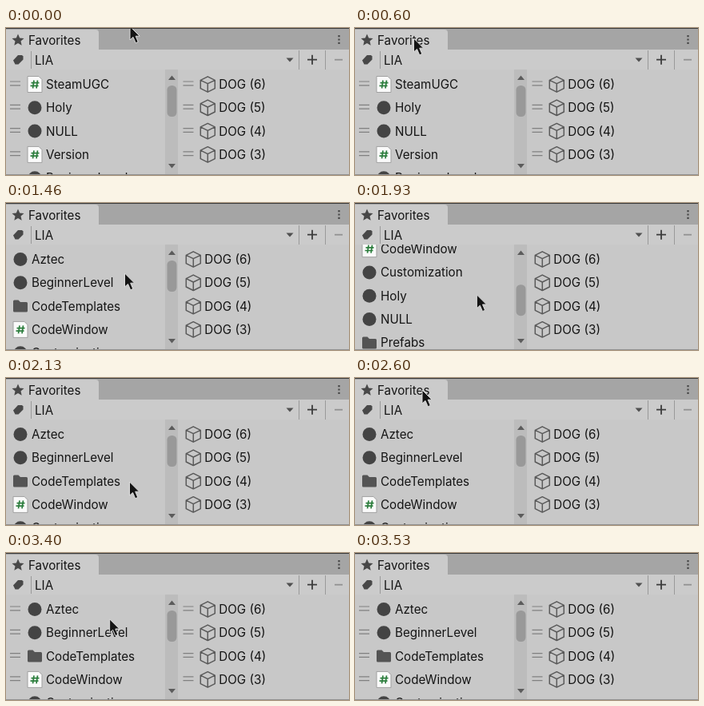
An HTML page for the animation above (4700 ms loop, 429 by 184 pixels).

```html
<!DOCTYPE html>
<html lang="en">
<head>
<meta charset="utf-8">
<title>Favorites panel</title>
<style>
  html, body { margin: 0; width: 100%; height: 100%; overflow: hidden; background: #c8c8c8; }
  svg { display: block; width: 100vw; height: 100vh; }
  text { font: 15.2px Inter, "Liberation Sans", sans-serif; fill: #141414; white-space: pre; }
  .menu text { font-size: 17.3px; fill: #262626; }
  .menu .on { fill: #fff; }
  .menu > rect { filter: drop-shadow(0 3px 4px #0007); }
</style>
</head>
<body>
<svg viewBox="0 0 429 184">
  <defs>
    <clipPath id="view"><rect y="52" width="429" height="131"/></clipPath>
    <g id="scene"><circle r="8.5" fill="#444"/></g>
    <g id="folder"><path d="M-9-6q0-1.5 1.5-1.5h5l2.5 2.5h7.500q1.500 0 1.500 1.500v9.500q0 1.500-1.500 1.500h-15q-1.500 0-1.500-1.500z" fill="#545454"/></g>
    <g id="script">
      <path d="M-9-10h14l4 4v16h-18z" fill="#fafafa" stroke="#a0a0a0" stroke-linejoin="round"/>
      <path d="M-1-5l-1.500 10M3.500-5l-1.500 10M-4.500-1.800h10M-5.500 1.800h10" fill="none" stroke="#2b7d3c" stroke-width="1.700"/>
    </g>
    <g id="cube"><path d="M0-9.700l9 4.500v10.400l-9 4.500l-9-4.500v-10.400zM-9-5.200l9 4.400l9-4.400M0-.8v10.500" fill="none" stroke="#5a5a5a" stroke-width="1.500" stroke-linejoin="round"/></g>
    <g id="handle"><path d="M0-3.500h13M0 1.300h13" stroke="#808080" stroke-width="1.200"/></g>
  </defs>

  <rect width="429" height="184" fill="#c8c8c8"/>
  <rect width="429" height="27" fill="#a5a5a5"/>
  <path d="M0 28V2h112q4 0 4 4v22z" fill="#cbcbcb"/>
  <rect y="27" width="429" height="25" fill="#cbcbcb"/>
  <path d="M15 7.500l2.200 5 5.300.5-4 3.600 1.200 5.200-4.700-2.800-4.700 2.800 1.200-5.200-4-3.600 5.300-.5z" fill="#484848"/>
  <text x="28" y="21">Favorites</text>
  <path d="M416.500 9v2.200M416.500 13.400v2.200M416.500 17.800v2.200" stroke="#444" stroke-width="2.200"/>
  <path d="M9 40.500l6-6.500h5l1.500 1.500v4l-6 6h-4z" fill="#484848"/>
  <text x="36" y="45.500">LIA</text>
  <path d="M31.500 29v22M366.500 28v24M399.500 28v24" stroke="#999"/>
  <path d="M350.500 37.500h9l-4.500 5z" fill="#505050"/>
  <path d="M377 39.700h12M383 33.700v12" stroke="#3c3c3c" stroke-width="1.800"/>
  <path d="M411 39.700h10" stroke="#929292" stroke-width="1.800"/>

  <g clip-path="url(#view)">
    <g id="unsorted"></g>
    <g id="sorted"></g>
    <g id="dogs"></g>
    <g id="handles"></g>
  </g>
  <rect x="199" y="52" width="16" height="131" fill="#bcbcbc"/>
  <path d="M203 65h9l-4.500-5.500zM203 170h9l-4.500 5.500z" fill="#5c5c5c"/>
  <rect id="thumb" x="201.500" y="72" width="12" height="39" rx="5.500" fill="#999"/>
  <path d="M0 183.500h429" stroke="#929292"/>

  <g id="menuA" class="menu"></g>
  <g id="menuB" class="menu"></g>
  <path id="cursor" d="M0 0v17l4-3.600 3.200 7.400 3.100-1.400-3.100-7.200h5z" fill="#141414" stroke="#ddd"/>
  <rect width="429" height="1" fill="#3a3a3a"/>
</svg>

<script>
const LOOP = 4700, FIRST = 70.5, PITCH = 29.3, SHIFT = 18;
const OPEN = [[640, 1290], [2840, 3330]];   // menu open and close times
const SCROLL = { from: 1640, to: 2130, peak: 110 };
const $ = id => document.getElementById(id);

const kinds = {
  SteamUGC: 'script', Holy: 'scene', NULL: 'scene', Version: 'script',
  BeginnerLevel: 'scene', Aztec: 'scene', Customization: 'scene',
  CodeTemplates: 'folder', CodeWindow: 'script', Prefabs: 'folder', Scripts: 'folder'
};
const names = Object.keys(kinds);
const rowY = i => FIRST + i * PITCH;
const use = (id, x, y) => `<use href="#${id}" x="${x}" y="${y}"/>`;
const rows = (list, x, kind) => list.map((name, i) =>
  use(kind(name), x, rowY(i)) + `<text x="${x + 14}" y="${rowY(i) + 5.5}">${name}</text>`).join('');

$('unsorted').innerHTML = rows(names, 36, n => kinds[n]);
$('sorted').innerHTML = rows([...names].sort(), 36, n => kinds[n]);
$('dogs').innerHTML = rows([6, 5, 4, 3].map(n => `DOG (${n})`), 252.3, () => 'cube');
$('handles').innerHTML = names.map((_, i) =>
  use('handle', 5, rowY(i)) + (i < 4 ? use('handle', 221.5, rowY(i)) : '')).join('');

function buildMenu(id, x, y, checked) {
  const items = ['Auto Sort', 'Maximize', 'Close'].map((label, i) =>
    `<text x="26" y="${23.5 + 24 * i}">${label}</text>`).join('');
  const tick = checked ? '<path d="M8 17l4 5.500 8-12" fill="none" stroke="#fff" stroke-width="2"/>' : '';
  $(id).setAttribute('transform', `translate(${x} ${y})`);
  $(id).innerHTML = `<rect width="130" height="83" rx="5" fill="#ededed"/>
    <path class="bar" d="M0 5.500h130v24H0z" fill="#2d88f8"/>${items}${tick}`;
  return { el: $(id), x, bar: $(id).querySelector('.bar'),
    first: $(id).querySelector('text'), tick: $(id).querySelector('[stroke]') };
}
const menus = [buildMenu('menuA', 76, 9.5, false), buildMenu('menuB', 87, 11, true)];

// Pointer stops: time, x, y
const path = [
  [0, 155, -2], [200, 68, 15], [260, 73.5, 13], [900, 73.5, 13], [1180, 110, 17],
  [1260, 110, 17], [1400, 148, 87], [1460, 148.5, 88], [1640, 148.5, 88],
  [2130, 154.5, 130], [2280, 154.5, 130], [2600, 84, 15], [2840, 84, 15],
  [3050, 123.5, 13.5], [3310, 123.5, 13.5], [3530, 140, 200], [LOOP, 140, 200]
];
function pointer(t) {
  const i = path.findIndex(p => p[0] > t);
  const [t0, x0, y0] = path[i - 1], [t1, x1, y1] = path[i];
  const k = (t - t0) / (t1 - t0), e = k * k * (3 - 2 * k);
  return [x0 + (x1 - x0) * e, y0 + (y1 - y0) * e];
}

const show = (el, on) => el.style.display = on ? '' : 'none';
const move = (el, x, y) => el.setAttribute('transform', `translate(${x} ${y})`);

function draw(t) {
  const [x, y] = pointer(t);
  const sorted = t >= OPEN[0][1];
  const auto = sorted && t < OPEN[1][1];
  const k = (t - SCROLL.from) / (SCROLL.to - SCROLL.from);
  const scroll = k > 0 && k < 1 ? SCROLL.peak * Math.sin(Math.PI * k) ** 2 : 0;
  const dx = auto ? -SHIFT : 0;

  show($('unsorted'), !sorted);
  show($('sorted'), sorted);
  show($('handles'), !auto);
  move($('sorted'), dx, -scroll);
  move($('dogs'), dx, 0);
  move($('thumb'), 0, scroll * 0.3);
  move($('cursor'), x, y);

  menus.forEach((m, i) => {
    const hover = x > m.x + 2;
    show(m.el, t >= OPEN[i][0] && t < OPEN[i][1]);
    show(m.bar, hover);
    m.first.classList.toggle('on', hover);
    if (m.tick) m.tick.setAttribute('stroke', hover ? '#fff' : '#262626');
  });
}

const start = performance.now();
function frame() {
  draw((performance.now() - start) % LOOP);
  requestAnimationFrame(frame);
}
frame();
</script>
</body>
</html>
```
